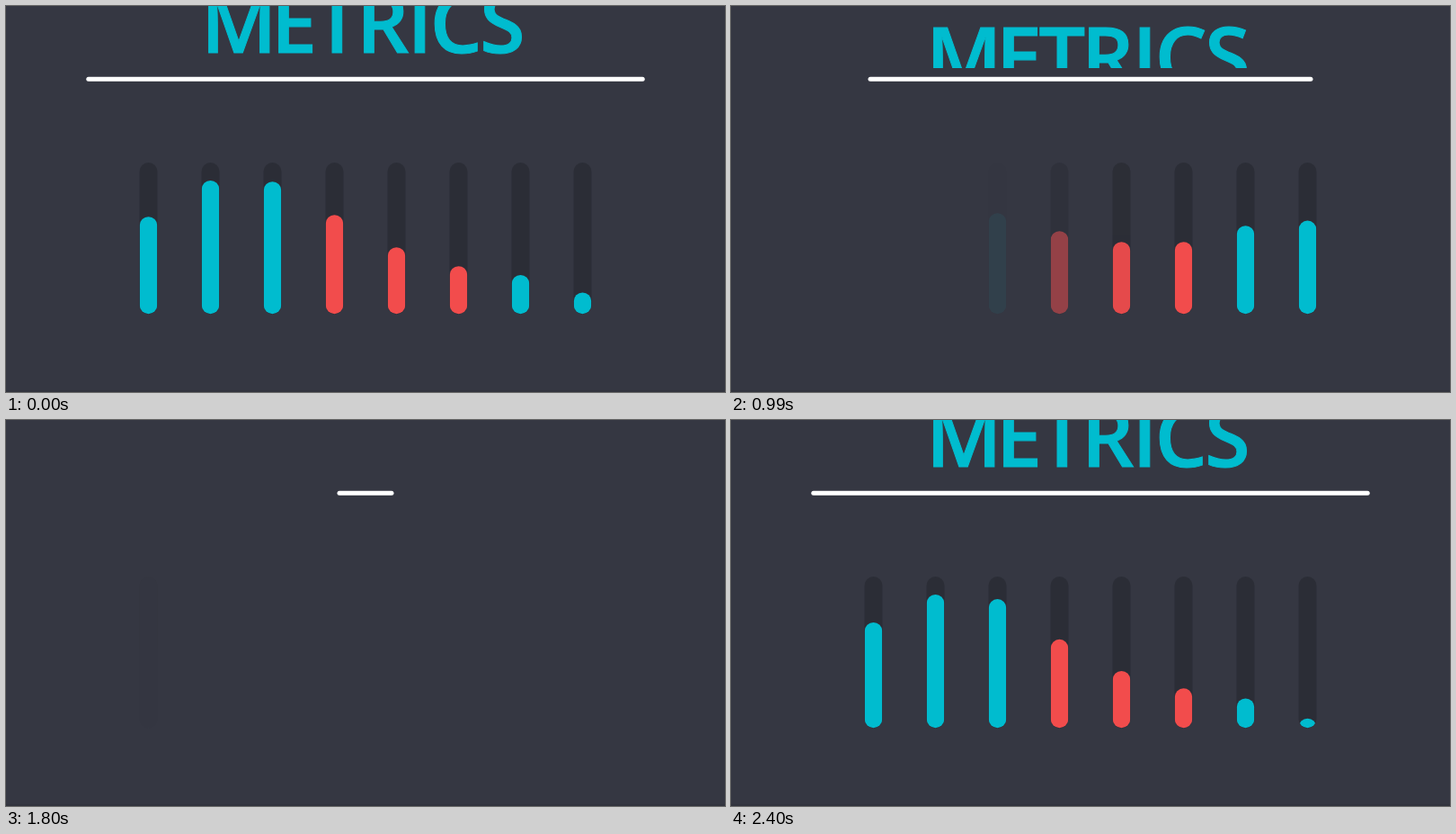
Animation of 800 by 429 pixels, one loop 2430 ms. Source, as an HTML page:

```html
<!DOCTYPE html>
<html lang="en">
<head>
<meta charset="utf-8">
<title>Metrics</title>
<style>
  html, body { margin: 0; width: 100%; height: 100%; overflow: hidden; background: #353742; }
  svg { display: block; }
  text {
    fill: #00bccf; stroke: #00bccf; stroke-width: 1px;
    font-weight: 600; font-family: "Open Sans", "Noto Sans", sans-serif;
  }
  #line { fill: #fff; }
  #edge { fill: #31333d; }
  .track { fill: #2b2d36; }
  .fill { fill: #00bccf; }
  .low { fill: #f24c4c; }
</style>
</head>
<body>
<svg id="stage" width="800" height="429" viewBox="0 0 800 429">
  <clipPath id="above"><rect width="800" height="69"/></clipPath>
  <clipPath id="pill"><rect x="-9.8" y="174.2" width="19.6" height="168" rx="9.8"/></clipPath>
  <g clip-path="url(#above)"><text></text></g>
  <rect id="line" y="78.7" height="5" rx="2.5"/>
  <rect id="edge" y="427" width="800" height="2"/>
</svg>
<script>
const LOOP = 2430, FRAME = 30, STAGGER = 60;
const HEIGHTS = [104, 124, 112, 92, 80, 80, 98, 104];
const MAX_HEIGHT = 148.3;

// Curves sampled every 60 ms
const BOUNCE = [0, .228, .441, .663, .925, 1.196, 1.3125, 1.21, 1.039, .8875,
                .875, .957, 1.045, 1.085, 1.088, 1.045, 1.003, .994, 1, 1];
const GROW = [-.188, 0, .188, .375, .563, .725, .855, .94, .98, .995, 1, 1];

const stage = document.getElementById('stage');
const line = document.getElementById('line');
const text = document.querySelector('text');

const clamp = (v, lo = 0, hi = 1) => Math.min(hi, Math.max(lo, v));
const ease = p => (1 - Math.cos(Math.PI * clamp(p))) / 2;

function add(parent, tag, attrs) {
  const el = document.createElementNS('http://www.w3.org/2000/svg', tag);
  for (const key in attrs) el.setAttribute(key, attrs[key]);
  return parent.appendChild(el);
}

// Catmull-Rom through evenly spaced samples
function sample(table, ms) {
  const last = table.length - 1;
  const x = clamp(ms / 60, 0, last);
  const i = Math.min(Math.floor(x), last - 1), f = x - i;
  const [a, b, c, d] = [-1, 0, 1, 2].map(k => table[clamp(i + k, 0, last)]);
  return b + f / 2 * (c - a + f * (2 * a - 5 * b + 4 * c - d + f * (3 * (b - c) + d - a)));
}

// Centre the ink of each letter on its place
function setTitle(word, centres, capHeight) {
  const ctx = document.createElement('canvas').getContext('2d');
  ctx.font = `600 100px ${getComputedStyle(text).fontFamily}`;
  const size = capHeight * 100 / ctx.measureText('E').actualBoundingBoxAscent;
  const xs = [...word].map((ch, i) => {
    const m = ctx.measureText(ch);
    return centres[i] - (m.actualBoundingBoxRight - m.actualBoundingBoxLeft) / 2 * size / 100;
  });
  text.style.fontSize = size + 'px';
  text.setAttribute('x', xs.join(' '));
  text.textContent = word;
}

const bars = HEIGHTS.map((height, i) => {
  const group = add(stage, 'g', { transform: `translate(${158.5 + 69 * i} 0)` });
  add(group, 'rect', { class: 'track', x: -10, y: 174, width: 20, height: 168.4, rx: 10 });
  const clip = add(group, 'g', { 'clip-path': 'url(#pill)' });
  const fill = add(clip, 'rect', {
    class: i > 2 && i < 6 ? 'low' : 'fill', x: -9.8, width: 19.6, height: 168, rx: 9.8
  });
  return { group, fill, height };
});

function draw(t) {
  // The entrance runs before zero, the exit after it
  const u = t < 1500 ? t : t - LOOP;

  bars.forEach(({ group, fill, height }, i) => {
    const age = u - STAGGER * i;
    group.setAttribute('opacity', ease((age + 660) / 180) - ease((age - 720) / 180));
    fill.setAttribute('y', 342.2 - Math.min(MAX_HEIGHT, height * sample(BOUNCE, age + 480)));
  });

  const grown = clamp(sample(GROW, 60 + Math.min(u + 660, 1260 - u)));
  const half = grown > 0 ? 308.2 * grown + 2.5 : 0;
  line.setAttribute('x', 400 - half);
  line.setAttribute('width', 2 * half);

  const hidden = 1 - ease((u + 510) / 360) + ease((u - 830) / 360);
  text.setAttribute('y', 51.5 + 91 * hidden);
}

function tick() {
  draw(Math.floor(performance.now() % LOOP / FRAME) * FRAME);
  requestAnimationFrame(tick);
}

setTitle('METRICS', [259, 322, 368.5, 423, 460.8, 502, 552.5], 65);
tick();
</script>
</body>
</html>
```
